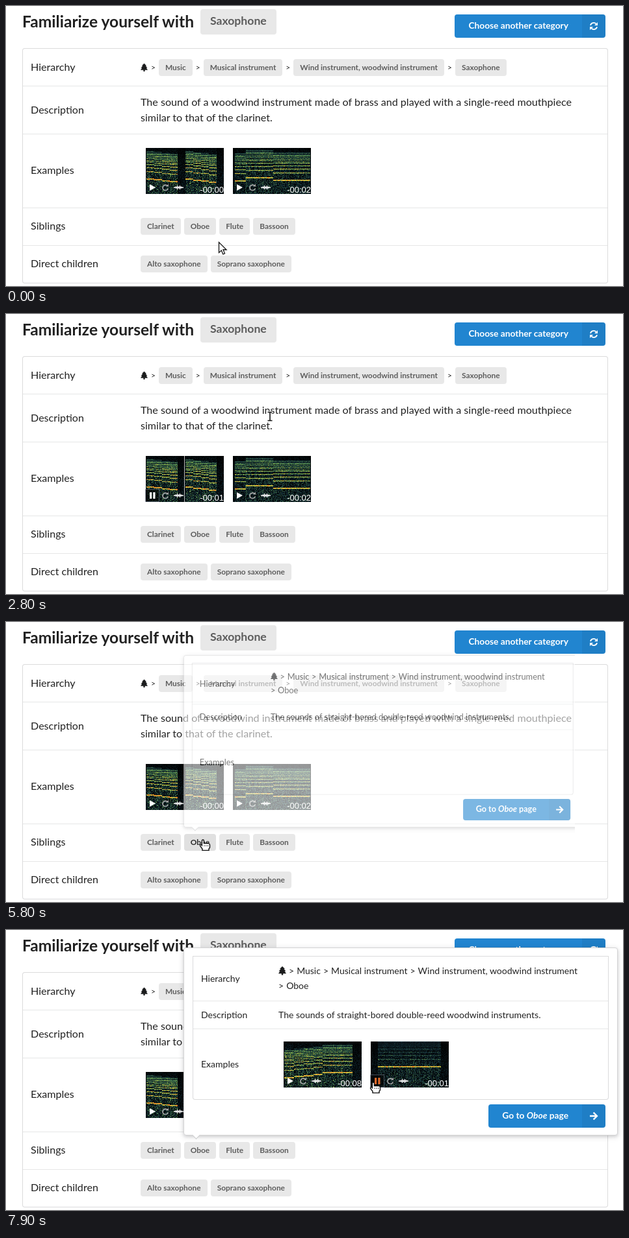
An HTML page with a canvas for the animation above (8 s loop, 949 px wide and 432 px high).

```html
<!DOCTYPE html>
<html lang="en">
<head>
<meta charset="utf-8">
<title>Category explorer</title>
<style>
html, body { margin: 0; width: 100%; height: 100%; overflow: hidden; background: #fff; }
body { font-family: Lato, sans-serif; color: rgba(0,0,0,.87); white-space: pre; }
* { box-sizing: border-box; }
#stage, .layer { position: absolute; left: 0; top: 0; width: 949px; height: 432px; overflow: hidden; }
.layer { overflow: visible; }
svg { display: block; overflow: visible; flex: none; }
h2 { position: absolute; left: 25px; top: 4px; margin: 0; font-size: 24.6px; line-height: 40px; }

.tag { padding: 0 10px; font-size: 11.9px; line-height: 26px; font-weight: 700; border-radius: 4px;
  background: #e8e8e8; color: rgba(0,0,0,.6); }
.big { position: absolute; left: 299px; top: 5px; height: 39px; padding: 0 15px; font-size: 17.6px; line-height: 35px; }

.table { position: absolute; left: 25px; top: 65px; width: 901px; height: 363px; font-size: 16.1px; line-height: 24px;
  border: 1px solid rgba(34,36,38,.16); border-radius: 4px; background: #fff; }
.row { display: flex; align-items: center; padding-left: 12px; border-bottom: 1px solid rgba(34,36,38,.11); }
.row:last-child { border: 0; }
.label { width: 169px; flex: none; }
.label, .copy { position: relative; top: -1px; }
.line { display: flex; align-items: center; gap: 5px; }
.sep { font-size: 12px; }
.shots { display: flex; gap: 14px; margin-left: 8px; }

.pop { position: absolute; left: 273px; top: 27px; width: 668px; height: 290px; background: #fff; border: 1px solid #d4d4d5;
  border-radius: 4px; box-shadow: 0 2px 4px rgba(34,36,38,.12), 0 2px 10px rgba(34,36,38,.15); }
.tip { position: absolute; left: 288px; top: 312px; width: 9px; height: 9px; background: #fff; transform: rotate(45deg);
  border: solid #c6c7c8; border-width: 0 1px 1px 0; }
.layer .table { left: 287px; top: 40px; width: 640px; height: 222px; font-size: 14px; line-height: 23px; border-radius: 0 0 4px 4px; }
.layer .label { width: 119px; }
.layer .line { flex-wrap: wrap; gap: 0 4px; margin-right: 12px; position: relative; top: -1px; }
.layer .sep { font-size: 14px; margin-right: 4px; }

.button { position: absolute; right: 27px; height: 36px; padding: 0 57px 0 21px; font-size: 13.75px; line-height: 34px; font-weight: 700;
  color: #fff; background: #2185d0; border-radius: 4px; overflow: hidden; }
.button svg { position: absolute; right: 0; top: 0; background: rgba(0,0,0,.05); }

.player { position: relative; width: 120px; height: 71px; }
.player > * { position: absolute; left: 0; top: 0; }
.head { width: 1px; height: 71px; background: rgba(255,255,255,.72); }
.player .clock { left: auto; right: 0; top: 55px; color: #fff; font: 13px/20px "Liberation Sans", Arial, sans-serif; }
</style>
</head>
<body>
<div id="stage"></div>
<script>
const stage = document.getElementById('stage');

function make(cls, ...children) {
  const el = document.createElement('div');
  el.className = cls;
  el.append(...children);
  return el;
}
function html(cls, markup) {
  const el = make(cls);
  el.innerHTML = markup;
  return el;
}
const toggle = (el, on) => { el.style.display = on ? '' : 'none'; };

const tag = name => make('tag', name);
const tags = names => make('line', ...names.map(tag));
const tree = width => html('', `<svg width="${width}" height="14" viewBox="0 0 12 14">
  <path fill="#1b1c1d" d="M6 0 10 4H8.4L11.4 7.6H9.6L12 11.2H7.2V13.6H4.8V11.2H0L2.4 7.6H.6L3.6 4H2Z"/></svg>`);

function button(markup, top, icon) {
  const el = html('button', `${markup}<svg width="36" height="36" viewBox="-18 -18 36 36">${icon}</svg>`);
  el.style.top = top + 'px';
  return el;
}
function table(rows) {
  return make('table', ...rows.map(([name, height, value]) => {
    const row = make('row', make('label', name), value);
    row.style.height = height + 'px';
    return row;
  }));
}

function random(seed) {
  return () => (seed = (seed * 16807) % 2147483647) / 2147483647;
}
const ramp = [[0, 0, 0], [18, 44, 54], [78, 132, 76], [222, 222, 66], [236, 112, 32]];
function heat(v) {
  const p = Math.min(v, .999) * 4, i = Math.floor(p);
  return ramp[i].map((c, k) => c + (ramp[i + 1][k] - c) * (p - i));
}
// each phrase [from, to, first row, last row] is four held notes with log-spaced overtones
function spectrogram({ phrases, power, hiss, seed }) {
  const W = 120, H = 71, rnd = random(seed), v = new Float32Array(W * H);
  for (let x = 0; x < W; x++) {
    const phrase = phrases.find(p => x >= p[0] && x < p[1]);
    const streak = hiss * (phrase ? .7 + .5 * rnd() : .4);
    for (let y = 0; y < H; y++) v[y * W + x] = streak * Math.min(1, .2 + y / 45) * rnd() ** 1.4;
    if (!phrase) continue;
    const [from, to, first, last] = phrase;
    const note = Math.floor(4 * (x - from) / (to - from));
    const base = first + (last - first) * note / 3;
    for (let k = 1; k <= 14; k++) {
      const y = Math.round(base - 11 * Math.log2(k));
      const s = (k === 1 ? .72 : power * (1 - k / 22)) * (.7 + .5 * rnd());
      v[y * W + x] += s;
      v[(y + 1) * W + x] += s * (k === 1 ? .8 : .3);
    }
  }
  const cv = document.createElement('canvas');
  cv.width = W; cv.height = H;
  const ctx = cv.getContext('2d'), img = ctx.createImageData(W, H);
  v.forEach((s, i) => img.data.set([...heat(s), 255], i * 4));
  ctx.putImageData(img, 0, 0);
  return cv;
}

function player(time, sound) {
  const head = make('head'), clock = make('clock', time);
  const icons = html('', `<svg width="120" height="71">
    <rect class="focus" x="-.5" y="51.5" width="21" height="19" fill="#000" fill-opacity=".6" stroke="#8792a8" stroke-dasharray="1 1"/>
    <path class="play" d="M6 56 15 61 6 66Z"/>
    <path class="pause" d="M6 56h3.2v10H6ZM11.3 56h3.2v10h-3.2Z"/>
    <path d="M33 58.2A4.2 4.2 0 1 0 34.2 62.5" fill="none" stroke="#aaa" stroke-width="1.6"/>
    <path d="M31 59.6H35V55.6Z" fill="#aaa"/>
    <path d="M43 61H58M46.5 59.5v3M48.5 58v6M50.5 59.3v3.4M52.5 58v6M54.5 59.5v3" stroke="#fff" stroke-width="1.3"/></svg>`);
  const [focus, play, pause] = ['focus', 'play', 'pause'].map(n => icons.querySelector('.' + n));
  const el = make('player', spectrogram(sound), head, icons, clock);
  function set(s) {
    play.style.fill = pause.style.fill = s.hover ? '#e0682a' : '#fff';
    toggle(play, !s.playing);
    toggle(pause, s.playing);
    toggle(focus, s.focus);
    toggle(head, s.at >= 0);
    head.style.left = Math.round(s.at || 0) + 'px';
    clock.textContent = s.left || time;
  }
  set({});
  return { el, set };
}

// page
const names = ['Music', 'Musical instrument', 'Wind instrument, woodwind instrument'];
const trail = [tree(11)];
[...names, 'Saxophone'].forEach(name => trail.push(make('sep', '>'), tag(name)));
const siblings = tags(['Clarinet', 'Oboe', 'Flute', 'Bassoon']);
const oboe = siblings.children[1];
const sax = player('-00:00', { phrases: [[1, 49, 47, 51], [61, 109, 47, 52]], power: .66, hiss: .5, seed: 11 });
const held = player('-00:02', { phrases: [[3, 20, 50, 50], [20, 62, 45, 45], [62, 119, 49, 49]], power: .6, hiss: .42, seed: 23 });

stage.append(
  html('', '<h2>Familiarize yourself with</h2>'),
  make('tag big', 'Saxophone'),
  button('Choose another category', 13, `<path fill="none" stroke="#fff" stroke-width="1.9"
    d="M-5-1.2A5 5 0 0 1 3.6-3.4M5 1.2A5 5 0 0 1-3.6 3.4"/><path fill="#fff" d="M6-6V-1H1ZM-6 6V1H-1Z"/>`),
  table([
    ['Hierarchy', 58, make('line', ...trail)],
    ['Description', 74, make('copy', 'The sound of a woodwind instrument made of brass and played with ' +
      'a single-reed mouthpiece\nsimilar to that of the clarinet.')],
    ['Examples', 113.6, make('shots', sax.el, held.el)],
    ['Siblings', 58, siblings],
    ['Direct children', 57, tags(['Alto saxophone', 'Soprano saxophone'])]]));

// popup
const crumbs = [...names, 'Oboe'].map(name => html('', `<span class="sep">&gt;</span>${name}`));
const rising = player('-00:08', { phrases: [[1, 60, 55, 50], [60, 106, 47, 47]], power: .62, hiss: .52, seed: 37 });
const steady = player('-00:01', { phrases: [[11, 108, 38, 38]], power: .26, hiss: .42, seed: 51 });
const shots = make('shots', rising.el, steady.el);
const pop = make('layer', make('pop'), make('tip'),
  table([
    ['Hierarchy', 69, make('line', tree(12), ...crumbs)],
    ['Description', 43, make('copy', 'The sounds of straight-bored double-reed woodwind instruments.')],
    ['Examples', 109, shots]]),
  button('Go to <i>Oboe</i> page', 269, '<path fill="none" stroke="#fff" stroke-width="2.3" d="M-6 0H5M-.4-5.4 5 0-.4 5.4"/>'));
pop.style.transformOrigin = '273px 317px';
const clip = make('layer', pop);

// pointer
const pointer = html('layer', `<svg width="1" height="1">
  <path class="arrow" d="M.5.5V16.6L4.3 13 6.8 19 9.5 17.8 7 12H12Z" fill="#fff" stroke="#111" stroke-width="1.3"/>
  <g class="hand"><path d="M-1.6 1.2C-1.6-.5 1.4-.5 1.4 1.2V5.6H8.5Q10.5 6 10.5 8V12L9 14V16.4H-1V14L-4.4 9.4Q-4.6 6.8-2.8 7.6L-1.6 8.8Z"
    fill="#fff" stroke="#111" stroke-width="1.4"/><path d="M2 8.5V10M4.8 8.5V10M7.6 8.5V10" stroke="#111"/></g>
  <g class="beam" fill="none"><path d="M-4-6.5H4M-4 6.5H4M0-6.5V6.5" stroke="#fff" stroke-width="3.6"/>
    <path d="M-3.5-6.5H3.5M-3.5 6.5H3.5M0-6.5V6.5" stroke="#111" stroke-width="1.6"/></g></svg>`);
const shapes = ['arrow', 'hand', 'beam'].map(n => [n, pointer.querySelector('.' + n)]);
stage.append(clip, pointer);

// [time, x, y]
const path = [
  [0, 327, 364], [300, 418, 382], [800, 223, 280], [1200, 223, 280], [2000, 253, 160], [3600, 559, 156],
  [3900, 561, 155], [4600, 375, 258], [4800, 333, 281], [5400, 303, 336], [6200, 303, 336],
  [6400, 326, 313], [7100, 512, 248], [7600, 565, 235], [8000, 565, 235]];

function place(t) {
  const i = path.findIndex(p => p[0] > t);
  const [t0, x0, y0] = path[i - 1], [t1, x1, y1] = path[i];
  const k = (t - t0) / (t1 - t0);
  return [Math.round(x0 + (x1 - x0) * k), Math.round(y0 + (y1 - y0) * k)];
}
const within = (t, a, b) => t >= a && t < b;

function draw(t) {
  const onPlay = within(t, 700, 1400), onTag = within(t, 5300, 6300), onPause = t >= 7500;
  const [x, y] = place(t);
  pointer.style.transform = `translate(${x}px, ${y}px)`;
  const kind = onPlay || onTag || onPause ? 'hand' : within(t, 2200, 4000) ? 'beam' : 'arrow';
  shapes.forEach(([n, el]) => toggle(el, n === kind));

  const length = 3200, gone = Math.max(0, t - 1230);
  const playing = t >= 1000 && gone < length;
  sax.set({
    playing, hover: onPlay, focus: within(t, 1000, 5600),
    at: playing ? 120 * gone / length : -1,
    left: '-00:0' + (playing ? Math.floor((length - gone) / 1000) : 0) });
  steady.set({ playing: t >= 7900, hover: onPause, focus: t >= 7800 });

  oboe.style.color = onTag ? 'rgba(0,0,0,.8)' : '';
  oboe.style.background = within(t, 5300, 6500) ? '#e0e0e0' : '';

  const k = Math.min(1, .585 + (t - 5800) / 200);
  toggle(clip, t >= 5800);
  clip.style.clipPath = k < 1 ? 'inset(0 74px 0 0)' : 'none';
  pop.style.opacity = k;
  pop.style.transform = k < 1 ? `scale(${.8 + .2 * k})` : 'none';
  shots.style.visibility = t >= 6000 ? '' : 'hidden';
}

const start = performance.now();
function frame() {
  const t = (performance.now() - start) % 8000;
  draw(Math.floor(t / 100) * 100);
  requestAnimationFrame(frame);
}
draw(0);
requestAnimationFrame(frame);
</script>
</body>
</html>
```
